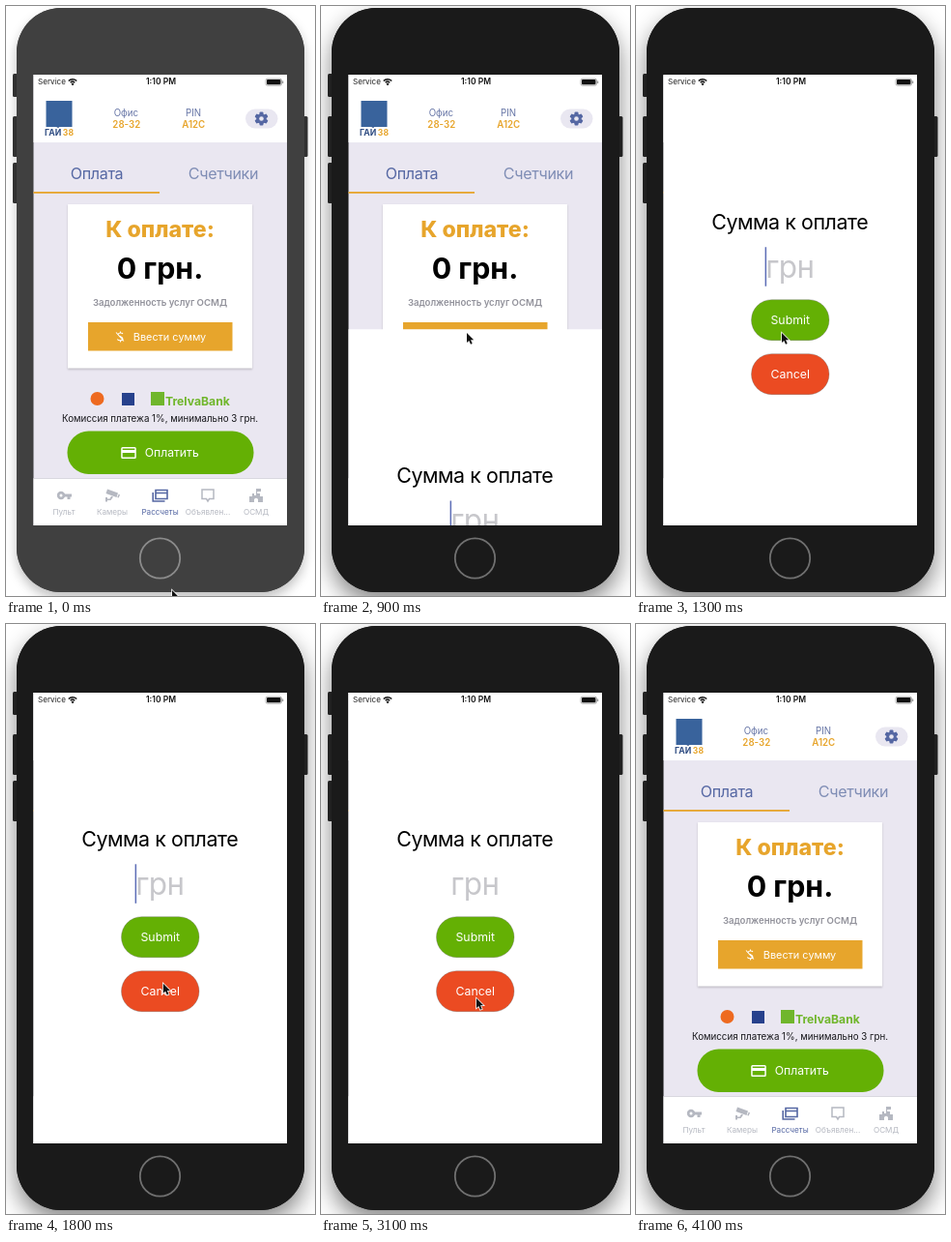
Write an HTML page with a canvas that moves like this. It is 320 px wide and 610 px high and loops after 4200 ms.

```html
<!DOCTYPE html>
<html lang="ru">
<head>
<meta charset="utf-8">
<style>
html, body { margin: 0; width: 100%; height: 100%; overflow: hidden; background: #fff; }
canvas { display: block; width: 320px; height: 610px; }
</style>
</head>
<body>
<canvas id="stage"></canvas>
<script>
const LOOP = 4200;
const SCREEN = { x: 28.5, y: 71, w: 262.5, h: 466 };
const BLUE = '#5567a3', ORANGE = '#e7a52c', GREEN = '#64b004', RED = '#eb4b22', PALE = '#b5b8c1';
const canvas = document.getElementById('stage');
const ctx = canvas.getContext('2d');
const ratio = window.devicePixelRatio || 1;
canvas.width = 320 * ratio;
canvas.height = 610 * ratio;

// Cursor tip: time, x, y
const cursorPath = [
  [0, 172, 604], [100, 172, 604], [600, 151, 338], [1450, 151, 338],
  [1950, 166, 381], [2250, 163, 383], [2500, 163, 383], [2900, 161, 387],
  [3220, 161, 387], [3480, 165, 577], [3650, 165, 577]
];

function rect(x, y, w, h, color) {
  ctx.fillStyle = color;
  ctx.fillRect(x, y, w, h);
}

function roundRect(x, y, w, h, r, color) {
  ctx.beginPath();
  ctx.roundRect(x, y, w, h, r);
  ctx.fillStyle = color;
  ctx.fill();
}

function circle(x, y, r, color) {
  ctx.beginPath();
  ctx.arc(x, y, r, 0, Math.PI * 2);
  ctx.fillStyle = color;
  ctx.fill();
}

function text(str, x, y, size, color, weight = 400, align = 'center') {
  ctx.font = `${weight} ${size}px Inter, "Open Sans", sans-serif`;
  ctx.letterSpacing = size > 15 && weight === 400 ? `${-0.02 * size}px` : '0px';
  ctx.textAlign = align;
  ctx.textBaseline = 'alphabetic';
  ctx.fillStyle = color;
  ctx.fillText(str, x, y + size * 0.36);
}

function path(d, x, y, color, line = 0) {
  ctx.save();
  ctx.translate(x, y);
  const shape = new Path2D(d);
  if (line) {
    ctx.lineWidth = line;
    ctx.strokeStyle = color;
    ctx.stroke(shape);
  } else {
    ctx.fillStyle = color;
    ctx.fill(shape, 'evenodd');
  }
  ctx.restore();
}

const clamp = v => Math.max(0, Math.min(1, v));
const smooth = v => v * v * (3 - 2 * v);

// Critically damped approach from 1 to 0
function spring(ms) {
  const k = Math.max(0, ms) * 0.0174;
  return (1 + k) * Math.exp(-k);
}

function sheetOffset(t) {
  const away = t < 3324 ? spring(t - 816) : 1 - spring(t - 3324);
  return away * SCREEN.h;
}

function drawPhone(active) {
  const body = active ? '#1a1a1a' : '#404040';
  const button = active ? '#202020' : '#303030';
  rect(0, 0, 320, 610, '#fff');
  ctx.save();
  ctx.shadowColor = active ? 'rgba(0,0,0,.48)' : 'rgba(0,0,0,.25)';
  ctx.shadowBlur = (active ? 24 : 12) * ratio;
  ctx.shadowOffsetY = (active ? 11 : 6) * ratio;
  roundRect(11, 2, 298, 604, 46, body);
  ctx.restore();
  for (const [y, h] of [[70, 24], [114, 42], [162, 42]]) roundRect(7, y, 5, h, 1.5, button);
  roundRect(308, 114, 4.5, 42, 1.5, button);
  roundRect(11, 2, 298, 604, 46, body);
  ctx.beginPath();
  ctx.arc(159.5, 571, 20.7, 0, Math.PI * 2);
  ctx.lineWidth = 1.8;
  ctx.strokeStyle = active ? '#707070' : '#8b8b8b';
  ctx.stroke();
}

function drawStatusBar() {
  text('Service', 33, 78.3, 8.1, '#222', 400, 'left');
  text('1:10 PM', 160.5, 78.3, 8.5, '#111', 600);
  ctx.strokeStyle = '#111';
  ctx.lineWidth = 1.4;
  for (const r of [3.2, 5.8]) {
    ctx.beginPath();
    ctx.arc(69, 81.5, r, -Math.PI * 0.76, -Math.PI * 0.24);
    ctx.stroke();
  }
  circle(69, 80.8, 1.2, '#111');
  ctx.beginPath();
  ctx.roundRect(269, 75.2, 16.5, 7, 1.8);
  ctx.lineWidth = 0.6;
  ctx.strokeStyle = '#777';
  ctx.stroke();
  roundRect(270, 76.1, 14.5, 5.2, 1, '#111');
  rect(286.3, 77.5, 0.9, 2.5, '#777');
}

function drawGear(x, y) {
  ctx.save();
  ctx.translate(x, y);
  for (let i = 0; i < 3; i++) {
    roundRect(-2, -7, 4, 14, 1, BLUE);
    ctx.rotate(Math.PI / 3);
  }
  circle(0, 0, 5.2, BLUE);
  circle(0, 0, 2.3, '#e9e7f1');
  ctx.restore();
}

function drawHeader() {
  rect(28, 71, 263, 70, '#fff');
  rect(41.5, 98, 27, 27, '#39639c');
  text('ГАЙ', 40, 131, 8.6, '#2f4c82', 700, 'left');
  text('38', 70, 131, 8.6, ORANGE, 700, 'right');
  text('Офис', 124.3, 111, 9.7, '#6675a6');
  text('28-32', 124.8, 123, 9.7, ORANGE, 600);
  text('PIN', 194, 111, 9.7, '#6675a6');
  text('A12C', 194.3, 123, 9.7, ORANGE, 600);
  roundRect(248, 106.5, 33.5, 20, 10, '#e9e7f1');
  drawGear(264.5, 116.5);
}

function drawCard() {
  ctx.save();
  ctx.shadowColor = 'rgba(0,0,0,.18)';
  ctx.shadowBlur = 2 * ratio;
  ctx.shadowOffsetY = ratio;
  rect(64, 205, 191, 169.5, '#fff');
  ctx.restore();
  text('К оплате:', 159.5, 231, 23.2, ORANGE, 800);
  text('0 грн.', 159.5, 271, 30.3, '#000', 700);
  text('Задолженность услуг ОСМД', 159.5, 307, 9.6, '#92929b', 600);
  rect(85, 327, 149.5, 29.5, ORANGE);
  text('Ввести сумму', 169.5, 342, 10.9, '#fff');
  path('M3 -3.2C2 -4.5 -1.2 -4.3 -1.8 -2.6M-1 -1C1 0 3 .4 3 2.2C3 4 -1.5 4.5 -2.7 2.4M.5 -5.6V-4M.5 4V5.6M-4 -4.5L4 4.5',
    118, 342, '#fff', 1.1);
}

function drawPayment() {
  circle(94.5, 406, 7, '#ee6a20');
  rect(120, 400, 13, 13, '#27418c');
  rect(150, 399, 14, 14, '#70b62c');
  text('TrelvaBank', 165, 408.8, 12.2, '#70b62c', 700, 'left');
  text('Комиссия платежа 1%, минимально 3 грн.', 159.5, 426, 9.75, '#16161a');
  roundRect(63.5, 439.5, 193, 44.5, 22, GREEN);
  path('M-6.3 -6H6.3Q7.8 -6 7.8 -4.5V4.5Q7.8 6 6.3 6H-6.3Q-7.8 6 -7.8 4.5V-4.5Q-7.8 -6 -6.3 -6ZM-6.3 -4.5V-3H6.3V-4.5ZM-6.3 0V4.5H6.3V0Z',
    127, 462, '#fff');
  text('Оплатить', 171.7, 462, 12.2, '#fff');
}

function drawTabBar() {
  rect(28, 488.5, 263, 49, '#fff');
  rect(28, 488, 263, 0.7, '#cfcdd5');
  const tabs = [['Пульт', 60], ['Камеры', 110], ['Рассчеты', 159.5], ['Объявлен...', 209], ['ОСМД', 259]];
  tabs.forEach(([label, x], i) => text(label, x, 523.3, 8.15, i === 2 ? BLUE : PALE));
  circle(57, 506, 4.2, PALE);
  path('M60 504.6H68V507.4H66.5V510H63.5V507.4H60Z', 0, 0, PALE);
  circle(57, 506, 1.5, '#fff');
  path('M-5 -6L6 -2L4.5 2.5L-6.5 -1.5ZM6.8 -1L8 0L6.6 3L5.2 2.4ZM-1 1.3L1 2L-1.5 5.5H-5V7H-7V2.5H-5V4H-2.5Z', 110, 505.5, PALE);
  path('M-4.5 -5.5H7.5V3.5H-4.5ZM-4.5 -2.5H7.5M-7.3 -3V6H5', 159.5, 506, BLUE, 1.6);
  path('M-6 -6H6V3.5H1.5L0 6L-1.5 3.5H-6Z', 209, 506, PALE, 1.5);
  path('M-7 7V1H-4V-2H-2V0H0V-7H5V-4H1.2V-2H4V1H7V7H2V4Q0 1.5 -2 4V7Z', 259, 506, PALE);
}

function drawMain() {
  rect(28, 71, 263, 466, '#eae7f1');
  drawHeader();
  text('Оплата', 94, 173, 16.1, BLUE);
  text('Счетчики', 225, 173, 16.1, '#7f8db5');
  rect(28, 192, 131, 1.8, ORANGE);
  drawCard();
  drawPayment();
  drawTabBar();
}

function pill(label, y, color) {
  roundRect(119.5, y, 80.5, 42, 21, color);
  ctx.lineWidth = 0.6;
  ctx.strokeStyle = 'rgba(90,90,90,.55)';
  ctx.stroke();
  text(label, 159.7, y + 21, 12.3, '#fff');
}

function caretAlpha(t) {
  if (t < 1500) return 1;
  const phase = (t + 50) % 1000;
  return phase < 300 ? clamp(1 - phase / 60) : clamp((phase - 270) / 50);
}

function drawSheet(t) {
  const offset = sheetOffset(t);
  if (offset > 465.7) return;
  ctx.save();
  ctx.translate(0, offset);
  rect(28, 71, 263, 466, '#fff');
  text('Сумма к оплате', 159.2, 222, 21.4, '#000');
  text('грн', 159.3, 268.5, 31.5, '#c7c7cb');
  ctx.globalAlpha = caretAlpha(t);
  rect(133.6, 248.3, 1.5, 40.5, '#5c6db6');
  ctx.globalAlpha = 1;
  pill('Submit', 302.7, GREEN);
  pill('Cancel', 358.7, RED);
  ctx.restore();
}

function drawCursor(t) {
  const next = cursorPath.findIndex(p => p[0] > t);
  if (next < 1) return;
  const [t0, x0, y0] = cursorPath[next - 1];
  const [t1, x1, y1] = cursorPath[next];
  const k = smooth((t - t0) / (t1 - t0));
  const x = x0 + (x1 - x0) * k, y = y0 + (y1 - y0) * k;
  const arrow = 'M0 0V10L2.3 7.9L4 11.7L5.7 11L4.1 7.3H7.2Z';
  path(arrow, x, y, '#fff', 1.5);
  path(arrow, x, y, '#111');
}

function render(t) {
  ctx.setTransform(ratio, 0, 0, ratio, 0, 0);
  drawPhone(t >= 690);
  ctx.save();
  ctx.beginPath();
  ctx.rect(SCREEN.x, SCREEN.y, SCREEN.w, SCREEN.h);
  ctx.clip();
  drawMain();
  drawSheet(t);
  drawStatusBar();
  ctx.restore();
  drawCursor(t);
}

const start = performance.now();
function tick() {
  render((performance.now() - start) % LOOP);
  requestAnimationFrame(tick);
}
tick();
</script>
</body>
</html>
```
